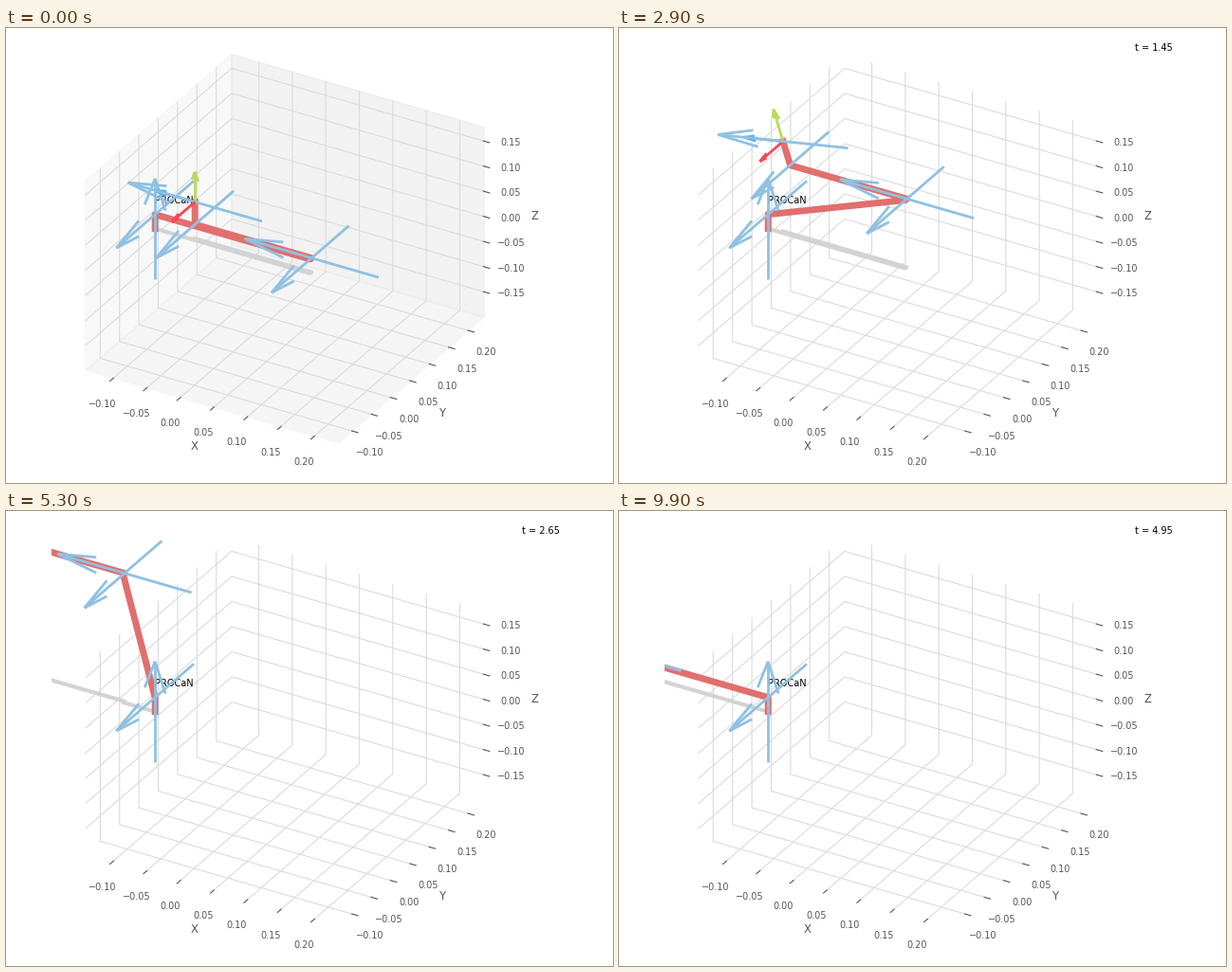
These frames come from a looping animation (640x480 px, 10000 ms). A matplotlib script:

```python
import numpy as np
import matplotlib.pyplot as plt
from matplotlib.animation import FuncAnimation
from matplotlib.collections import LineCollection

plt.rcParams.update({"font.family": "DejaVu Sans", "font.size": 7})

W, H, FRAMES = 640, 480, 100
GREY, GRID = "#555555", "#dbdbdb"

# Orthographic view (azim -60, elev 30) of a 4:4:3 box
MID = np.array([0.04886, 0.0506, -0.01135])
SPAN = 0.3785
LO, HI = MID - SPAN / 2, MID + SPAN / 2
SIDE = 308.88 / SPAN
AXES = SIDE * np.array([[0.8660, 0.25], [0.5, -0.4330], [0, -0.6495]])
CENTRE = np.array([294.486, 233.51])
TOWARD_EYE = np.array([0.433, -0.75, 0.375])
STEP = SPAN * 0.96 / 12

# Arm geometry in metres
BASE = np.array([-0.1162, 0, 0])
SHOULDER = BASE + [0, 0, 0.0283]
UPPER, FORE, HAND, OFFSET = 0.2315, 0.174, 0.0447, 0.0035
AXIS_LEN, EE_LEN = 0.2, 0.06
BACK = np.array([0, -1, 0])


def project(p):
    return CENTRE + (np.asarray(p, float) - MID) @ AXES


fig = plt.figure(figsize=(W / 100, H / 100), dpi=100, facecolor="white")
ax = fig.add_axes([48 / W, 0, 480 / W, 1])
ax.set(xlim=(48, 528), ylim=(H, 0))
ax.axis("off")


def line(points, **kw):
    return ax.plot(*project(points).T, **kw)[0]


def label(p, s, **kw):
    x, y = project(p)
    return ax.text(x, y, s, clip_on=False, **kw)


def draw_box():
    (x0, y0, z0), (x1, y1, z1) = LO, HI
    walls = [
        ([(x0, y0, z0), (x0, y1, z0), (x0, y1, z1), (x0, y0, z1)], 0.95),
        ([(x0, y1, z0), (x1, y1, z0), (x1, y1, z1), (x0, y1, z1)], 0.90),
        ([(x0, y0, z0), (x1, y0, z0), (x1, y1, z0), (x0, y1, z0)], 0.925),
    ]
    panes = [ax.fill(*project(pts).T, color=(g, g, g, 0.5), lw=1, zorder=0)[0]
             for pts, g in walls]

    pad = 11.5 * 48 / 691.2 * STEP
    far = 22 * 48 / 691.2 * STEP
    grid = []

    def tick(p, out, shift, value):
        p, out = np.array(p), np.array(out)
        line([p - 0.1 * STEP * out, p + 0.2 * STEP * out], color=GREY, lw=0.8,
             zorder=1.5, clip_on=False)
        text = f"{value:.2f}".replace("-", "\u2212")
        label(p + pad * np.array(shift), text, color=GREY, ha="center", va="top")

    sides = {"X": (0, -1, -1), "Y": (1, 0, -1), "Z": (1, 1, 0)}
    for v in np.arange(-2, 5) * 0.05:
        grid.append([(v, y1, z1), (v, y1, z0), (v, y0, z0)])
        tick((v, y0, z0), (0, -1, 0), sides["X"], v)
        grid.append([(x0, v, z1), (x0, v, z0), (x1, v, z0)])
        tick((x1, v, z0), (1, 0, 0), sides["Y"], v)
    for v in np.arange(-3, 4) * 0.05:
        grid.append([(x0, y0, v), (x0, y1, v), (x1, y1, v)])
        tick((x1, y1, v), (1, 0, 0), sides["Z"], v)
    ax.add_collection(LineCollection([project(g) for g in grid], colors=GRID,
                                     linewidths=0.8, zorder=1), autolim=False)

    for name, side in sides.items():
        side = np.array(side)
        edge = MID + side * (SPAN / 2 + far)
        label(edge, name, color=GREY, size=8.4, ha="center", va="center")
        a, b = MID + side * SPAN / 2, MID + side * SPAN / 2
        i = "XYZ".index(name)
        a[i], b[i] = LO[i], HI[i]
        line([a, b], color="white", lw=1, zorder=0.5)
    return panes


def arrow(start, vec):
    """Shaft and two 15 degree head strokes of a 3D arrow."""
    start, vec = np.asarray(start, float), np.asarray(vec, float)
    flat = np.hypot(vec[0], vec[1])
    k = np.array([vec[1], -vec[0], 0]) / flat if flat > 1e-9 else np.array([0, 1.0, 0])
    tip = start + vec
    c, s = np.cos(np.radians(15)), np.sin(np.radians(15))
    heads = [tip - 0.3 * (c * vec + sign * s * np.cross(k, vec)) for sign in (1, -1)]
    return np.array([[start, tip], [heads[0], tip], [heads[1], tip]])


def joint_axis(p, d):
    vec = AXIS_LEN * np.asarray(d)
    return arrow(p - vec / 2, vec)


def pose(k):
    """Arm points and arrows; quintic joint path from rest to rest."""
    t = k / (FRAMES - 1)
    s = t**3 * (10 - 15 * t + 6 * t * t)
    a, b = np.pi * s, np.pi / 2 * s
    elbow = SHOULDER + UPPER * np.array([np.cos(a), 0, np.sin(a)])
    roll = elbow + [0, OFFSET, 0]
    wrist = roll + [-FORE, 0, 0]
    up = np.array([-np.sin(b), 0, np.cos(b)])
    ahead = np.array([-np.cos(b), 0, -np.sin(b)])
    hand = wrist + HAND * up
    arrows = [arrow(hand, EE_LEN * d) for d in (BACK, up, ahead)]
    arrows += [joint_axis(p, d) for p, d in (
        (BASE, (0, 0, 1)), (SHOULDER, BACK), (elbow, BACK),
        (roll, (-1, 0, 0)), (wrist, BACK), (hand, ahead))]
    return np.array([BASE, SHOULDER, elbow, roll, wrist, hand]), arrows


panes = draw_box()
shadow = line([BASE, BASE], color="lightgrey", lw=3, zorder=2)
arm = line([BASE, BASE], color="#E16F6D", lw=5, zorder=2.1)
label(BASE + [0, 0, 0.05], "PROCaN", color="black", zorder=3)
timer = fig.text(0.85, 0.95, "", color="black")
strokes = []
for colour in ["#F84752", "#BADA55", "#54AEFF"] + ["#8FC1E2"] * 6:
    lc = LineCollection([], colors=colour, linewidths=2)
    strokes.append(ax.add_collection(lc, autolim=False))


def update(k):
    points, arrows = pose(k)
    arm.set_data(*project(points).T)
    shadow.set_data(*project(points * [1, 1, 0]).T)
    # nearer arrows cover farther ones
    near = [(a @ TOWARD_EYE).max() for a in arrows]
    for rank, i in enumerate(np.argsort(near, kind="stable")):
        strokes[i].set_segments(project(arrows[i]))
        strokes[i].set_zorder(4 + rank)
    for pane in panes:
        pane.set_visible(k == 0)
    timer.set_text(f"t = {k * 0.05:.2f}" if k else "")
    return [arm, shadow, timer, *strokes, *panes]


anim = FuncAnimation(fig, update, frames=FRAMES, interval=100, repeat=True,
                     repeat_delay=0, blit=False)
plt.show()
```
